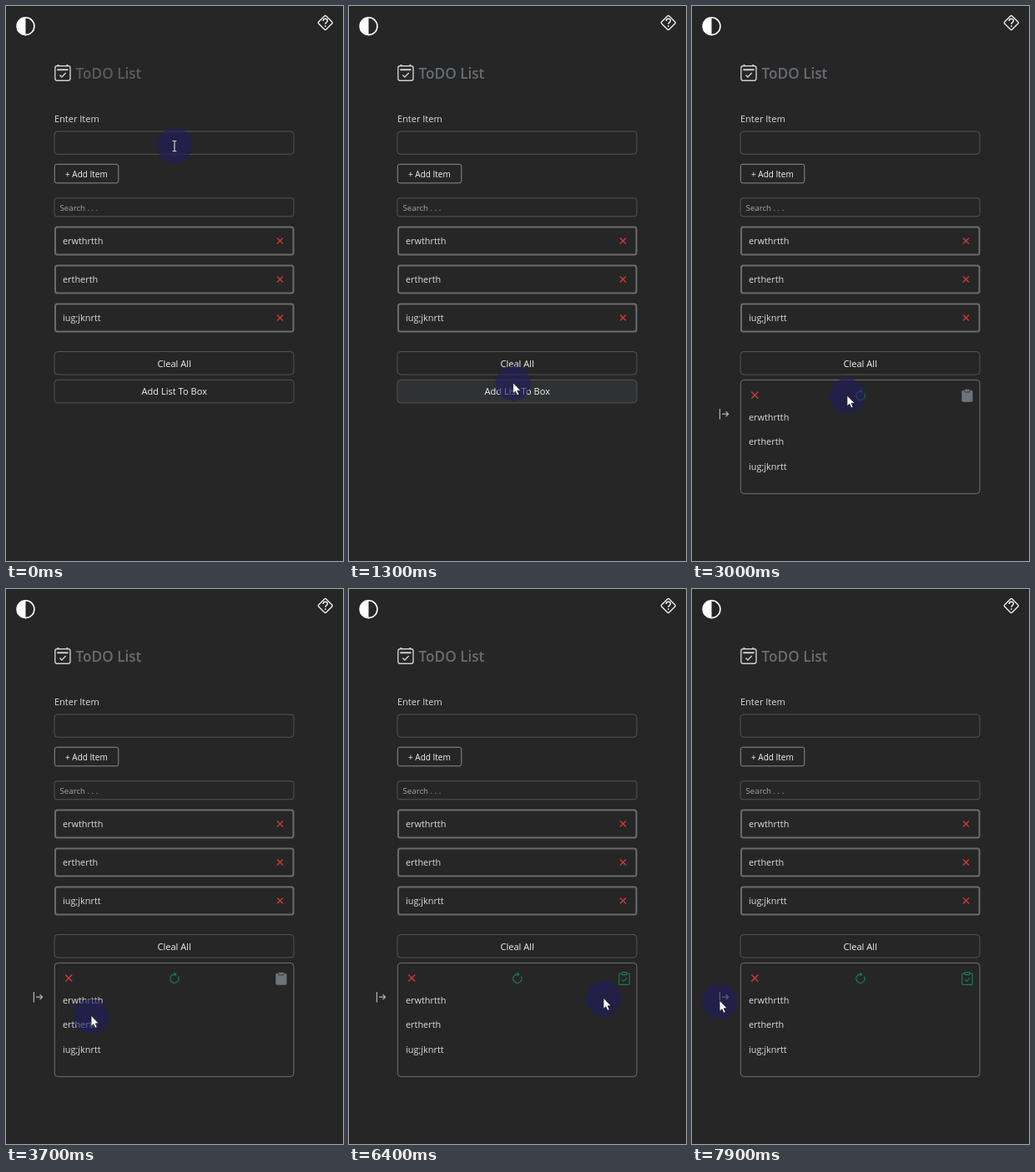
An HTML page for the animation above (8000 ms loop, 404x664 px).

```html
<!DOCTYPE html>
<html lang="en">
<head>
<meta charset="utf-8">
<title>ToDO List</title>
<style>
  html, body { margin: 0; width: 100%; height: 100%; overflow: hidden; background: #262626; }
  svg { display: block; width: 404px; height: 664px; font: 10.9px "Open Sans", "Noto Sans", sans-serif; fill: none; }
  text { fill: #dcdcdc; }
  .mid { text-anchor: middle; font-size: 11.1px; fill: #f0f0f0; }
  .box { stroke: #545454; }
  .item { stroke: #6c6c6c; stroke-width: 2; }
  .red { stroke: #cf3a38; stroke-width: 1.4; }
  .green { stroke: #1b7a55; stroke-width: 1.2; }
</style>
</head>
<body>
<svg viewBox="0 0 404 664">
  <!-- theme and help icons -->
  <circle cx="23.5" cy="24.2" r="10.4" stroke="#fff" stroke-width="1.6"/>
  <path d="M23.5 13.8a10.4 10.4 0 0 0 0 20.8z" fill="#fff"/>
  <rect x="-6.4" y="-6.4" width="12.8" height="12.8" rx="1.4" transform="translate(382.8 20) rotate(45)" stroke="#eee" stroke-width="1.4"/>
  <path d="M380.2 17.9c.1-3.5 5.3-3.4 5.2-.3c0 2-2.5 1.9-2.5 4.1M382.9 23.2v1.7" stroke="#eee" stroke-width="1.5"/>

  <!-- heading -->
  <g stroke="#d0d0d0" stroke-width="1.4">
    <rect x="58.8" y="71.8" width="18.2" height="17.4" rx="2.4"/>
    <path d="M62.5 70v2M73.3 70v2M61.3 76.2h13.2" stroke-width="1.9"/>
    <path d="M64.4 82.4l2.5 2.5 4.8-4.9"/>
  </g>
  <text id="title" x="83.5" y="86.5" font-size="17.2" font-weight="600">ToDO List</text>

  <!-- form -->
  <text x="58" y="139" font-size="11">Enter Item</text>
  <rect class="box" x="58" y="150" width="287" height="27.3" rx="4"/>
  <rect x="58.3" y="189.3" width="76.5" height="22.5" rx="2.5" stroke="#8c8c8c"/>
  <text x="71" y="204.6" font-size="10" font-weight="500" style="fill:#f4f4f4">+ Add Item</text>
  <rect class="box" x="58" y="229.8" width="287" height="22" rx="3"/>
  <text x="64.5" y="244.6" font-size="9.7" style="fill:#a6a6a6">Search . . .</text>

  <g id="items"></g>

  <rect class="box" id="clear" x="58" y="413.5" width="287" height="27.5" rx="4"/>
  <text class="mid" x="201.7" y="431.5">Cleal All</text>
  <g id="addButton">
    <rect class="box" id="add" x="58" y="447.3" width="287" height="27.5" rx="4"/>
    <text class="mid" x="201.7" y="465.3">Add List To Box</text>
  </g>

  <!-- saved list -->
  <g id="saved">
    <rect x="58.3" y="447.4" width="286.7" height="136" rx="4" stroke="#707070"/>
    <path class="red" d="M71.3 461.5l8 8m0-8l-8 8"/>
    <g class="green">
      <path d="M202 460.9a5.2 5.2 0 1 0 4.5 2.7"/>
      <path d="M201.6 458.3l3.2 2.6-3.2 2.6z" fill="#1b7a55" stroke="none"/>
    </g>
    <g id="copy" fill="#6c757d">
      <rect x="323.3" y="459.8" width="13.2" height="14" rx="1.8"/>
      <rect x="326.6" y="458.3" width="6.6" height="3.6" rx="1" stroke="#262626" stroke-width=".8"/>
    </g>
    <g id="copied" class="green">
      <rect x="323.7" y="460.2" width="12.5" height="13.2" rx="1.6"/>
      <rect x="327" y="458.6" width="6" height="3" rx="1" fill="#262626"/>
      <path d="M327.1 467.3l2.1 2.1 3.8-4"/>
    </g>
    <path d="M33.4 482v12.5M36 488.2h7.6m-3-3l3 3-3 3" stroke="#b4b4b4" stroke-width="1.2"/>
  </g>

  <!-- pointer -->
  <g id="pointer">
    <circle r="21" fill="#201d62" fill-opacity=".58"/>
    <circle id="ring" r="16.5" stroke="#43205f" stroke-width="4" stroke-opacity=".85"/>
    <path id="beam" d="M-2.4-5.5h1.6l.8.7.8-.7h1.6M0-5V6M-2.4 6.8h1.6L0 6l.8.8h1.6" stroke="#ddd" stroke-width="1.1"/>
    <path id="arrow" d="M0-.8V12.4l2.9-2.7 2 4.6 2.4-1-2-4.5h4z" fill="#fff" stroke="#111" stroke-width=".8"/>
  </g>
</svg>
<script>
const $ = id => document.getElementById(id);
const LOOP = 8000, STEP = 100;
const words = ["erwthrtth", "ertherth", "iug;jknrtt"];

words.forEach((word, i) => {
  const y = 281 + 46 * i;
  $("items").innerHTML += `<rect class="item" x="59" y="${y - 16.5}" width="285.5" height="33" rx="2.5"/>
    <text x="68" y="${y + 4}">${word}</text>
    <path class="red" d="M325 ${y - 3.5}l7 7m0-7l-7 7"/>`;
  $("saved").innerHTML += `<text x="68" y="${496 + 29.4 * i}">${word}</text>`;
});

// pointer stops: time, x, y
const path = [
  [0, 202, 167], [900, 189, 405], [1000, 189, 405], [1400, 198, 460], [2800, 198, 460],
  [3700, 102, 511], [4400, 329, 463], [5500, 329, 463], [6400, 305, 490],
  [6800, 304, 507], [7300, 329, 465], [7900, 33, 493]
];
const clicks = [1900, 4900];

const ease = p => p * p * (3 - 2 * p);
const show = (id, on) => $(id).setAttribute("visibility", on ? "inherit" : "hidden");

function pointerAt(t) {
  const i = path.findIndex(stop => stop[0] >= t);
  if (i <= 0) return path[0].slice(1);
  const [t0, x0, y0] = path[i - 1], [t1, x1, y1] = path[i];
  const p = ease((t - t0) / (t1 - t0));
  return [x0 + (x1 - x0) * p, y0 + (y1 - y0) * p];
}

function draw(now) {
  const t = Math.floor(now % LOOP / STEP) * STEP;
  const [x, y] = pointerAt(t);
  const open = t >= 2000, copied = t >= 5000;
  const inInput = y > 150 && y < 178;
  const hover = (id, top) => $(id).setAttribute("fill", y > top && y < top + 27.5 ? "#303133" : "none");

  $("pointer").setAttribute("transform", `translate(${x} ${y})`);
  show("beam", inInput);
  show("arrow", !inInput);
  show("ring", clicks.some(c => t >= c && t < c + 400));
  hover("clear", 413.5);
  hover("add", 447.3);
  show("addButton", !open);
  show("saved", open);
  show("copy", open && !copied);
  show("copied", open && copied);
  $("title").style.fill = t < 500 ? "#5c5c5e" : "#686c73";
  requestAnimationFrame(draw);
}
requestAnimationFrame(draw);
</script>
</body>
</html>
```
